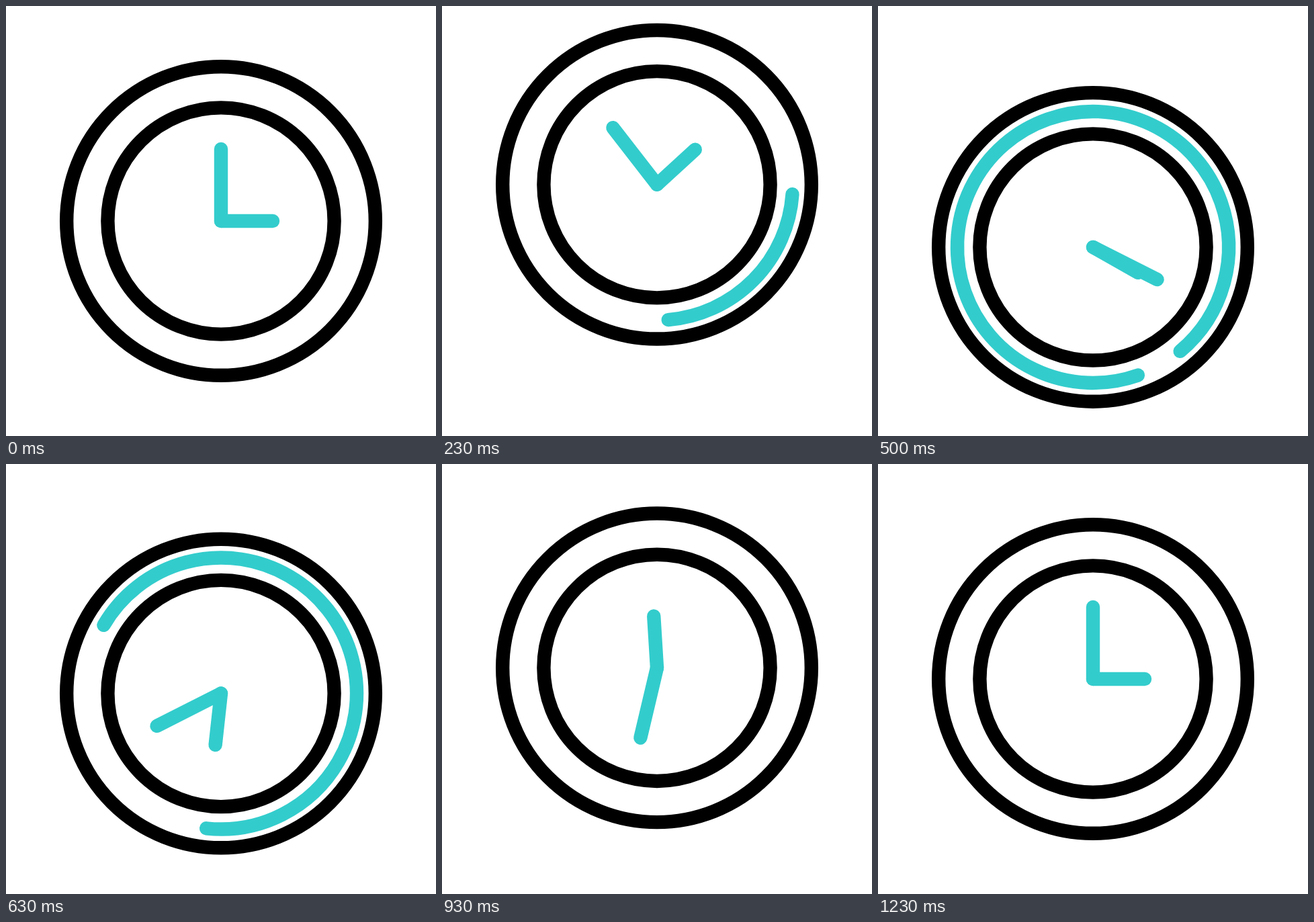
Recreate the animation shown at these times as an HTML page with a canvas. Size 640 by 640 pixels, loop 1.67 s.

```html
<!DOCTYPE html>
<html>
<head>
<meta charset="utf-8">
<title>Clock</title>
<style>
  html, body { margin: 0; width: 100%; height: 100%; overflow: hidden; background: #fff; }
  canvas { display: block; }
</style>
</head>
<body>
<canvas id="stage" width="640" height="640"></canvas>
<script>
const ctx = document.getElementById('stage').getContext('2d');
const LOOP = 1670, STEP = 100 / 3;
const INK = '#000', TEAL = '#33cccc';
const RAD = Math.PI / 180;

// Cubic Bezier easing, solved by bisection
function bezier(x1, y1, x2, y2) {
  const cubic = (a, b, s) => 3 * (1 - s) ** 2 * s * a + 3 * (1 - s) * s * s * b + s ** 3;
  return u => {
    if (u <= 0) return 0;
    if (u >= 1) return 1;
    let lo = 0, hi = 1;
    for (let i = 0; i < 30; i++) {
      const mid = (lo + hi) / 2;
      if (cubic(x1, x2, mid) < u) lo = mid; else hi = mid;
    }
    return cubic(y1, y2, lo);
  };
}

const ease = bezier(.42, 0, .58, 1);
const hourEase = bezier(.362, -.558, .707, 1);
const minuteEase = bezier(.362, -.375, .707, 1);

// Vertical bounce: [tick, centre y]
const bounce = [[0, 320], [8, 264], [16, 362], [24, 292], [33, 320]];

function bounceY(tick) {
  let y = bounce[0][1];
  for (let i = 1; i < bounce.length; i++) {
    const [t0, y0] = bounce[i - 1], [t1, y1] = bounce[i];
    y += (y1 - y0) * ease((tick - t0) / (t1 - t0));
  }
  return y;
}

function arc(color, radius, from = 0, to = 360) {
  ctx.strokeStyle = color;
  ctx.beginPath();
  ctx.arc(0, 0, radius, from * RAD, to * RAD);
  ctx.stroke();
}

function hand(length, angle) {
  ctx.strokeStyle = TEAL;
  ctx.beginPath();
  ctx.moveTo(0, 0);
  ctx.lineTo(length * Math.sin(angle * RAD), -length * Math.cos(angle * RAD));
  ctx.stroke();
}

function draw(tick) {
  ctx.setTransform(1, 0, 0, 1, 0, 0);
  ctx.fillStyle = '#fff';
  ctx.fillRect(0, 0, 640, 640);
  ctx.translate(320, bounceY(tick));
  ctx.lineWidth = 20.4;
  ctx.lineCap = 'round';

  arc(INK, 229.8);
  arc(INK, 168.6);

  const turn = 120 * ease((tick - 4.2) / 21.4);
  const head = 360 * ease((tick - 2.2) / 14.6);
  const tail = 360 * ease((tick - 13.3) / 14.6);
  if (head - tail > .01) arc(TEAL, 202, tail + turn, head + turn);

  hand(107, 720 * minuteEase(tick / 37));
  hand(77, 90 + 360 * hourEase(tick / 37));
}

function frame() {
  const time = performance.now() % LOOP;
  draw(Math.floor((time + 3.4) / STEP));
  requestAnimationFrame(frame);
}
frame();
</script>
</body>
</html>
```
